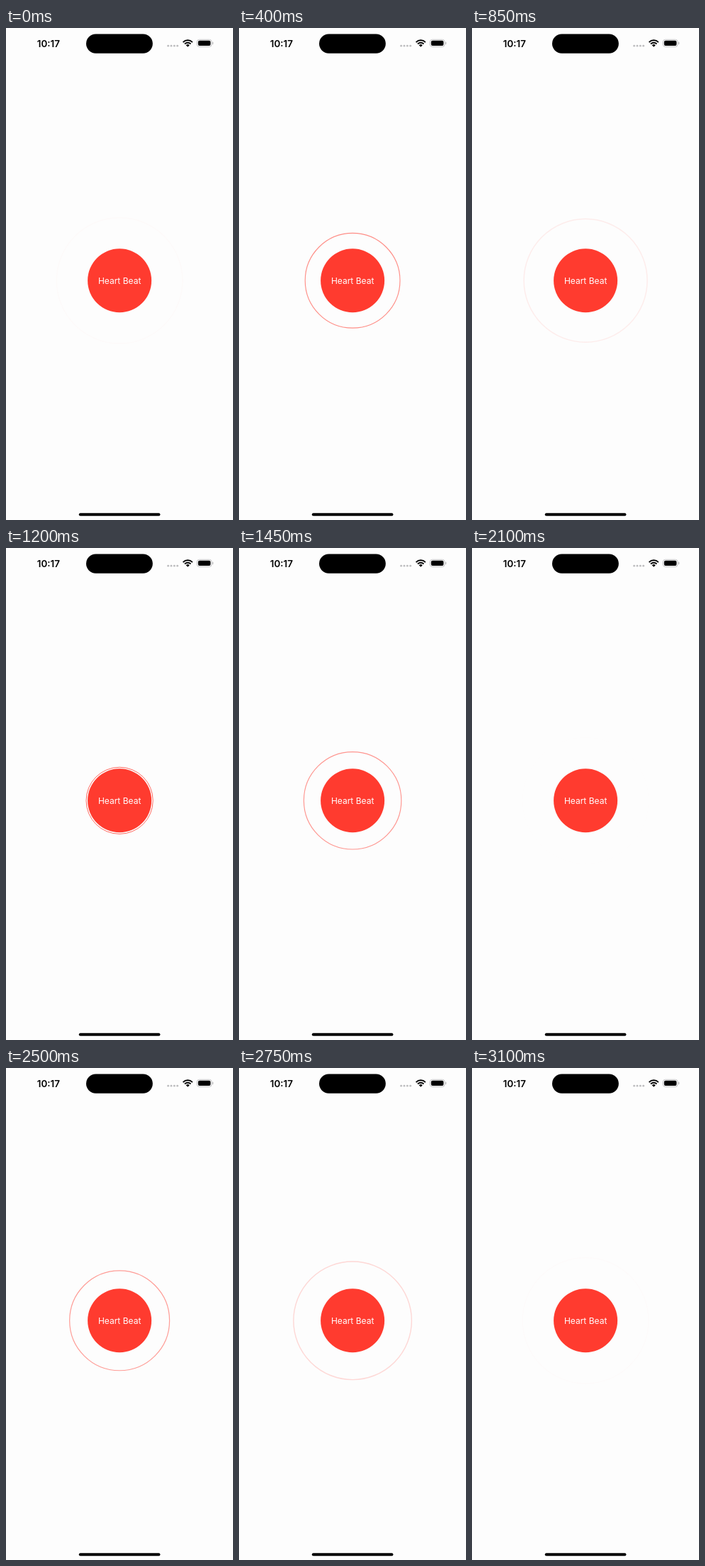
An HTML page with a canvas that plays this animation: 320x694 px, repeating every 3.15 s.

```html
<!DOCTYPE html>
<html lang="en">
<head>
<meta charset="utf-8">
<title>Heart Beat</title>
<style>
  html, body { margin: 0; width: 100%; height: 100%; overflow: hidden; background: #fdfdfd; }
  canvas { display: block; width: 320px; height: 694px; }
</style>
</head>
<body>
<canvas id="stage"></canvas>
<script>
const W = 320, H = 694, LOOP = 3150, STEP = 50;
const BEAT = 1028, FIRST_BEAT = 97;
const CX = 160.1, CY = 356.3;
const PAPER = '#fdfdfd', RED = '#ff3b2f', GREY = '#bdbdbf';
const canvas = document.getElementById('stage');
const ctx = canvas.getContext('2d');
const dpr = window.devicePixelRatio || 1;
canvas.width = W * dpr;
canvas.height = H * dpr;
ctx.scale(dpr, dpr);

// cubic-bezier(.25, .1, .25, 1)
function ease(x) {
  const curve = (a, b, u) => 3 * a * u * (1 - u) ** 2 + 3 * b * u * u * (1 - u) + u ** 3;
  let lo = 0, hi = 1;
  for (let i = 0; i < 30; i++) {
    const mid = (lo + hi) / 2;
    if (curve(0.25, 0.25, mid) < x) lo = mid; else hi = mid;
  }
  return curve(0.1, 1, lo);
}

function disc(x, y, r, color) {
  ctx.fillStyle = color;
  ctx.beginPath();
  ctx.arc(x, y, r, 0, Math.PI * 2);
  ctx.fill();
}

function pill(x, y, w, h, r, color) {
  ctx.fillStyle = color;
  ctx.beginPath();
  ctx.roundRect(x, y, w, h, r);
  ctx.fill();
}

function label(text, x, y, font, color) {
  ctx.font = font + ' Inter, "Liberation Sans", sans-serif';
  ctx.textAlign = 'center';
  ctx.textBaseline = 'alphabetic';
  ctx.fillStyle = color;
  ctx.fillText(text, x, y);
}

function wifi(x, y) {
  const from = -Math.PI * 0.75, to = -Math.PI * 0.25;
  ctx.strokeStyle = '#000';
  ctx.lineWidth = 1.9;
  for (const r of [9.4, 6]) {
    ctx.beginPath();
    ctx.arc(x, y, r, from, to);
    ctx.stroke();
  }
  ctx.fillStyle = '#000';
  ctx.beginPath();
  ctx.moveTo(x, y);
  ctx.arc(x, y, 3.5, from, to);
  ctx.fill();
}

function battery() {
  ctx.strokeStyle = GREY;
  ctx.lineWidth = 0.9;
  ctx.beginPath();
  ctx.roundRect(269.2, 16.3, 20.8, 10.2, 3.4);
  ctx.stroke();
  pill(270.8, 17.8, 17.6, 7.2, 2, '#000');
  pill(291, 19.6, 1.2, 3.6, 0.6, GREY);
}

function statusBar() {
  label('10:17', 59.9, 26.5, '600 13.4px', '#000');
  pill(113, 8.5, 93.8, 27.2, 13.6, '#000');
  for (let i = 0; i < 4; i++) disc(228.6 + i * 4.35, 25.2, 1.4, GREY);
  wifi(256.2, 26.7);
  battery();
}

function ring(t) {
  const phase = ((t - FIRST_BEAT + BEAT) % BEAT) / BEAT;
  const e = ease(phase);
  ctx.globalAlpha = (1 - e) ** 0.8;
  ctx.strokeStyle = RED;
  ctx.lineWidth = 0.75 * (1 + e);
  ctx.beginPath();
  ctx.arc(CX, CY, 44.5 * (1 + e), 0, Math.PI * 2);
  ctx.stroke();
  ctx.globalAlpha = 1;
}

function draw(t) {
  ctx.fillStyle = PAPER;
  ctx.fillRect(0, 0, W, H);
  statusBar();
  ring(t);
  disc(CX, CY, 45, RED);
  label('Heart Beat', CX, 361, '400 12px', '#fff');
  pill(102.8, 684.3, 114.6, 3.9, 1.95, '#000');
}

const start = performance.now();
function tick() {
  const t = (performance.now() - start) % LOOP;
  draw(Math.floor(t / STEP) * STEP);
  requestAnimationFrame(tick);
}
tick();
</script>
</body>
</html>
```
